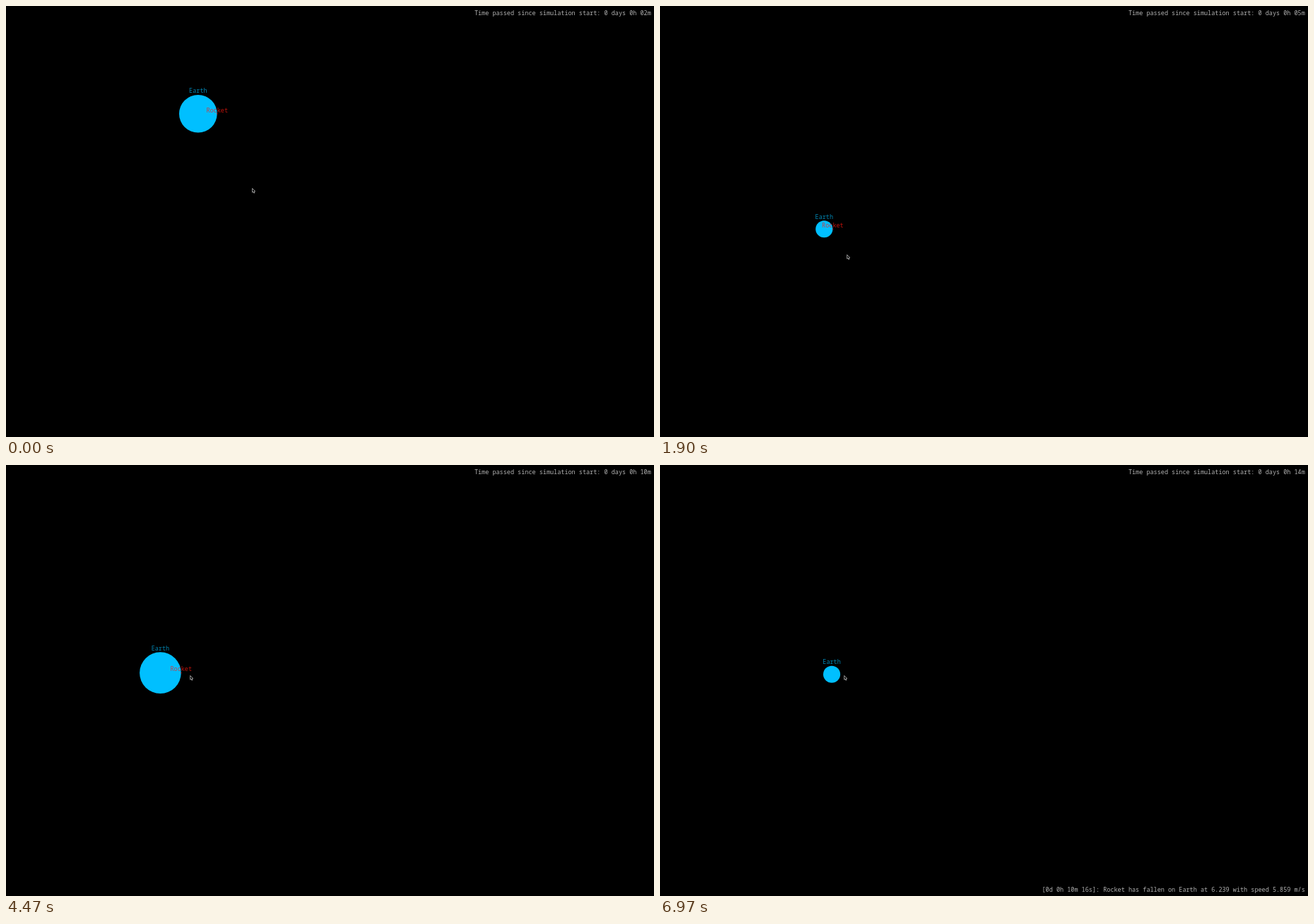
Recreate the animation shown at these times as an HTML page with a canvas. Size 917 by 611 pixels, loop 7 s.

```html
<!DOCTYPE html>
<html lang="en">
<head>
<meta charset="utf-8">
<title>Rocket simulation</title>
<style>
  html, body { margin: 0; height: 100%; overflow: hidden; background: #000; }
  canvas { display: block; }
</style>
</head>
<body>
<canvas id="stage" width="917" height="611"></canvas>
<script>
const LOOP = 7000;
const MINUTE = 610;          // milliseconds per simulated minute
const START_OFFSET = 1630;   // simulated time already elapsed, in milliseconds
const CRASH = 4630;
const ZOOM_STEP = 1.03;      // scale factor of one wheel tick
const GRAY = '#b2b2b2';
const ctx = document.getElementById('stage').getContext('2d');

const move = (start, end, x, y, dragging = false) => ({ start, end, x, y, dragging });
const zoom = (start, end, ticks) => ({ start, end, ticks });

// Everything on screen follows from these mouse gestures.
const gestures = [
  move(200, 370, 342.9, 232.8),
  move(430, 870, 264.3, 352.3, true),
  zoom(975, 1630, -26),
  zoom(1870, 2070, -16),
  zoom(2470, 3130, 25),
  move(3240, 3400, 224.9, 315.3),
  zoom(3740, 3900, 20),
  move(4040, 4300, 260.3, 298.2),
  zoom(4540, 4730, 21),
  zoom(4970, 5100, 2),
  zoom(5660, 5830, -20),
  zoom(6070, 6300, -15),
  zoom(6500, 6630, -17),
  zoom(6870, 6970, -1)
];

const smooth = p => p * p * (3 - 2 * p);
const accelerate = p => p ** 1.4;

function sceneAt(t) {
  const cursor = { x: 348.2, y: 258.2 };
  const earth = { x: 271.85, y: 152.75, r: 26.85 };

  for (const gesture of gestures) {
    if (t < gesture.start) break;
    const progress = Math.min(1, (t - gesture.start) / (gesture.end - gesture.start));
    if (gesture.ticks) {
      const scale = ZOOM_STEP ** Math.round(gesture.ticks * accelerate(progress));
      earth.x = cursor.x + (earth.x - cursor.x) * scale;
      earth.y = cursor.y + (earth.y - cursor.y) * scale;
      earth.r *= scale;
    } else {
      const dx = (gesture.x - cursor.x) * smooth(progress);
      const dy = (gesture.y - cursor.y) * smooth(progress);
      for (const item of gesture.dragging ? [cursor, earth] : [cursor]) {
        item.x += dx;
        item.y += dy;
      }
    }
  }
  return { cursor, earth };
}

function disc(x, y, r, color) {
  ctx.fillStyle = color;
  ctx.beginPath();
  ctx.arc(x, y, r, 0, Math.PI * 2);
  ctx.fill();
}

function label(text, x, y, color, align = 'center') {
  ctx.fillStyle = color;
  ctx.textAlign = align;
  ctx.fillText(text, x, y);
}

const arrow = new Path2D('M.4 .4V6L1.7 5L2.6 7L3.6 6.6L2.9 4.7L4.4 4.5Z');

function drawCursor({ x, y }) {
  ctx.save();
  ctx.translate(x, y);
  ctx.fillStyle = '#000';
  ctx.fill(arrow);
  ctx.lineWidth = 0.75;
  ctx.strokeStyle = '#ccc';
  ctx.stroke(arrow);
  ctx.restore();
}

function draw(t) {
  ctx.fillStyle = '#000';
  ctx.fillRect(0, 0, 917, 611);
  ctx.font = '8.5px "Noto Sans Mono", monospace';

  const { cursor, earth } = sceneAt(t);
  disc(earth.x, earth.y, earth.r, '#00bfff');
  label('Earth', earth.x, earth.y - earth.r - 2.6, 'rgba(0,191,255,.7)');

  if (t < CRASH) {
    const rocketX = earth.x + earth.r;
    disc(rocketX, earth.y, 0.7, '#f00');
    label('Rocket', rocketX, earth.y - 2.2, 'rgba(255,25,15,.75)');
  } else {
    label('[0d 0h 10m 16s]: Rocket has fallen on Earth at 6.239 with speed 5.859 m/s',
      912.8, 604.8, GRAY, 'right');
  }

  const minutes = String(Math.floor((t + START_OFFSET) / MINUTE)).padStart(2, '0');
  label(`Time passed since simulation start: 0 days 0h ${minutes}m`, 912.8, 12.8, GRAY, 'right');
  drawCursor(cursor);
}

// The picture advances at 30 frames per second.
function tick() {
  const t = performance.now() % LOOP;
  draw(Math.round(Math.floor((t + 5) * 0.03) / 0.3) * 10 % LOOP);
  requestAnimationFrame(tick);
}
tick();
</script>
</body>
</html>
```
